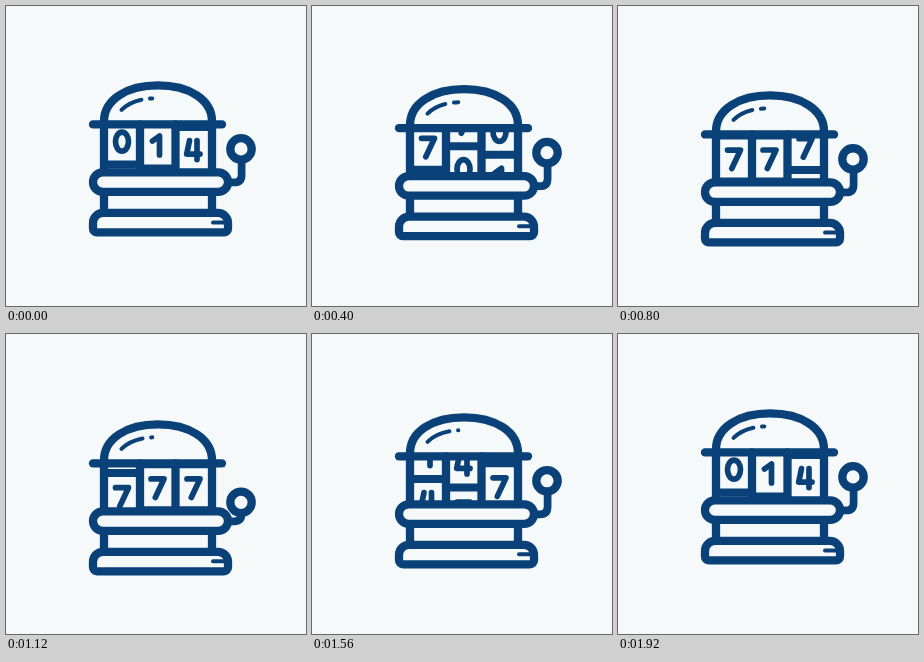
Write an HTML page with a canvas that moves like this. It is 300 px wide and 300 px high and loops after 1960 ms.

```html
<!DOCTYPE html>
<html lang="en">
<head>
<meta charset="utf-8">
<title>Slot machine</title>
<style>
html, body { margin: 0; width: 100%; height: 100%; overflow: hidden; background: #f5f9fa; }
canvas { display: block; width: 300px; height: 300px; }
</style>
</head>
<body>
<canvas id="stage"></canvas>
<script>
const INK = '#0a4178', PAPER = '#f5f9fa';
const LOOP = 1960, CYCLE = 1920, STEP = 40;
const PITCH = 46, STRIP = PITCH * 4, BRIM = 118;

const canvas = document.getElementById('stage');
const ratio = window.devicePixelRatio || 1;
canvas.width = canvas.height = 300 * ratio;
const ctx = canvas.getContext('2d');

// Digits are centred on 0,0, listed from the bottom of the strip upwards.
const DIGITS = [
  'M-6.5 -8.4H6.5L-2.2 10.1',
  'M-4 -9.5L-6.8 4H6.5M3.5 -9.5V9.5',
  'M-5 -4.5L2 -9.5V9.5',
  'M0 -9.5A6.5 9.5 0 0 1 0 9.5A6.5 9.5 0 0 1 0 -9.5Z'
].map(d => new Path2D(d));

const REELS = [
  { x: 116, delay: 0 },
  { x: 151.5, delay: 240 },
  { x: 187.5, delay: 480 }
];

const DOME = new Path2D('M98 118V115C98 93 121 79 152 79S206 93 206 115V118');
const SHINE = new Path2D('M115.5 103.5Q126 93 146.3 92');
const SHINE_LEN = 33.7;

const CAPSULE = new Path2D();
CAPSULE.roundRect(87, 166, 135, 19.5, 9.75);
const BASE = new Path2D();
BASE.roundRect(87, 206.5, 135, 19.5, [10, 10, 4, 4]);

const mod = (a, n) => ((a % n) + n) % n;
const clamp = v => Math.max(0, Math.min(1, v));
const ease = v => (1 - Math.cos(Math.PI * clamp(v))) / 2;

function stroke(path, width = 8.3) {
  ctx.lineWidth = width;
  ctx.stroke(path);
}

function line(x1, y1, x2, y2, width) {
  const p = new Path2D();
  p.moveTo(x1, y1);
  p.lineTo(x2, y2);
  stroke(p, width);
}

function solid(path) {
  ctx.fill(path);
  stroke(path);
}

function drawReel({ x, delay }, t) {
  const spin = STRIP * ease(mod(t - 896 - delay, CYCLE) / 1600);
  DIGITS.forEach((digit, i) => {
    const y = BRIM + mod(24 + spin - PITCH * i + PITCH, STRIP) - PITCH;
    ctx.save();
    ctx.translate(x, y);
    stroke(digit, 5.7);
    ctx.restore();
    line(x - 16, y + 23, x + 16, y + 23, 8);
  });
}

function drawShine(t) {
  const start = 144 - 2.2 * Math.sin(2 * Math.PI * t / CYCLE);
  const tail = Math.max(0.1, 146.3 - start), gap = 8.7;
  ctx.setLineDash([SHINE_LEN - tail - gap, gap, tail + 5, 100]);
  stroke(SHINE, 4);
  ctx.setLineDash([]);
}

function drawLever(t) {
  const pull = 14.5 * Math.sin(Math.PI * clamp((t - 880) / 480));
  const y = 142.5 + pull;
  stroke(new Path2D(`M235.6 ${y}V168.5Q235.6 176 228 176H222`), 7.7);
  const ball = new Path2D();
  ball.arc(235, y, 10.7, 0, 7);
  solid(ball);
}

function draw(t) {
  const bob = 11.3 * (t < 1020 ? ease(t / 1020) : ease((CYCLE - t) / 900));
  ctx.setTransform(ratio, 0, 0, ratio, 0, 0);
  ctx.fillStyle = PAPER;
  ctx.strokeStyle = INK;
  ctx.lineCap = ctx.lineJoin = 'round';
  ctx.fillRect(0, 0, 300, 300);
  ctx.translate(0, bob + 0.4);

  drawLever(t);

  ctx.save();
  ctx.beginPath();
  ctx.rect(98, BRIM, 108, 50);
  ctx.clip();
  REELS.forEach(reel => drawReel(reel, t));
  ctx.restore();

  line(134, BRIM, 134, 168);
  line(169.5, BRIM, 169.5, 168);
  line(98, BRIM, 98, 206);
  line(206, BRIM, 206, 206);
  stroke(DOME);
  drawShine(t);
  line(87, BRIM, 216, BRIM);
  solid(CAPSULE);
  solid(BASE);
  line(207, 216, 220, 216, 4);
}

let begin;
function tick(now) {
  if (begin === undefined) begin = now;
  // Steps of 40 ms; the last step closes on the opening pose.
  const step = Math.floor((now - begin) / STEP + 0.15);
  draw((step * STEP) % LOOP);
  requestAnimationFrame(tick);
}
draw(0);
requestAnimationFrame(tick);
</script>
</body>
</html>
```
